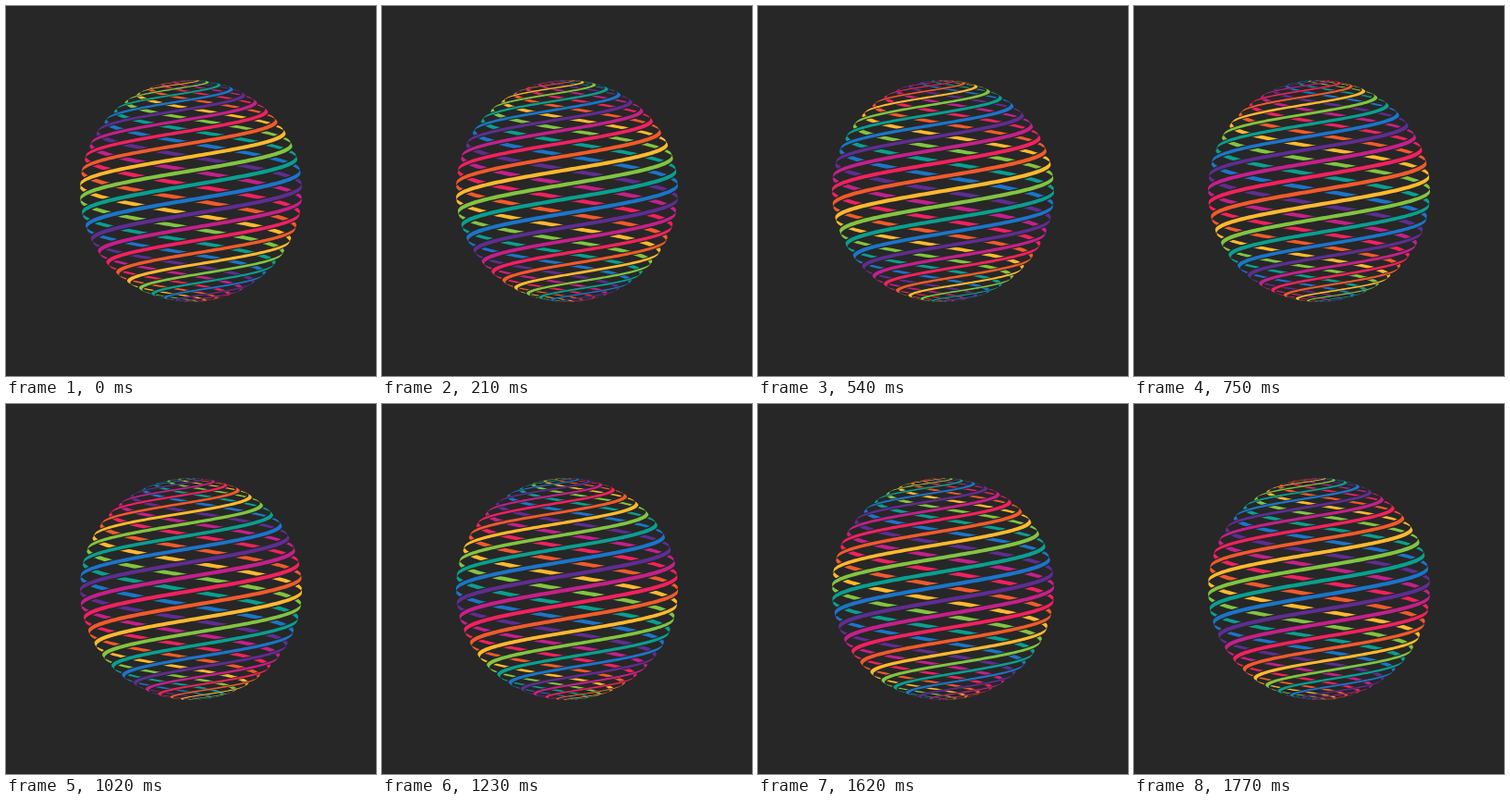
Animation of 400 by 400 pixels, one loop 1800 ms. Source, as an HTML page with a canvas:

```html
<!DOCTYPE html>
<html lang="en">
<head>
<meta charset="utf-8">
<title>Spiral sphere</title>
<style>
  html, body { margin: 0; width: 100%; height: 100%; overflow: hidden; background: #272727; }
  canvas { display: block; width: 400px; height: 400px; }
</style>
</head>
<body>
<canvas id="stage" width="400" height="400"></canvas>
<script>
  const ctx = document.getElementById('stage').getContext('2d');
  const BG = '#272727';
  const COLORS = ['#fdb92e', '#82c441', '#0a9f8f', '#1b75c9',
                  '#5f2d91', '#c4208b', '#f2215f', '#f15a2b'];
  const LOOP = 1800, STEP = 30;
  const CENTER = 200, RADIUS = 120;
  const RISE = 60;            // degrees of latitude gained per full turn
  const START = 3;            // latitude of the first strand at the left rim
  const HALF = 1;             // half the ribbon width, in degrees
  const GAP = 0.75;           // dark margin beside the front ribbons
  const rad = Math.PI / 180;

  function point(lat, lon) {
    const a = Math.max(-90, Math.min(90, lat)) * rad;
    return [CENTER + RADIUS * Math.cos(a) * Math.sin(lon * rad),
            CENTER - RADIUS * Math.sin(a)];
  }

  // One half turn of a ribbon, from longitude `from`, where it has latitude `base`.
  function ribbon(base, from, half, color) {
    ctx.beginPath();
    for (let d = 0; d <= 180; d += 2) ctx.lineTo(...point(base + d * RISE / 360 + half, from + d));
    for (let d = 180; d >= 0; d -= 2) ctx.lineTo(...point(base + d * RISE / 360 - half, from + d));
    ctx.closePath();
    ctx.fillStyle = color;
    ctx.fill();
  }

  function eachStrand(turn, draw) {
    COLORS.forEach((color, i) => {
      const lat = START - RISE * (i / COLORS.length + turn);
      for (let j = -2; j <= 3; j++) draw(lat + j * RISE, color);
    });
  }

  function render(time) {
    const turn = Math.floor((time % LOOP) / STEP) * STEP / LOOP;
    ctx.fillStyle = BG;
    ctx.fillRect(0, 0, 400, 400);
    eachStrand(turn, (lat, color) => ribbon(lat + RISE / 2, 90, HALF, color));
    eachStrand(turn, lat => ribbon(lat, -90, HALF + GAP, BG));
    eachStrand(turn, (lat, color) => ribbon(lat, -90, HALF, color));
  }

  const begin = performance.now();
  function tick() {
    render(performance.now() - begin);
    requestAnimationFrame(tick);
  }
  tick();
</script>
</body>
</html>
```
